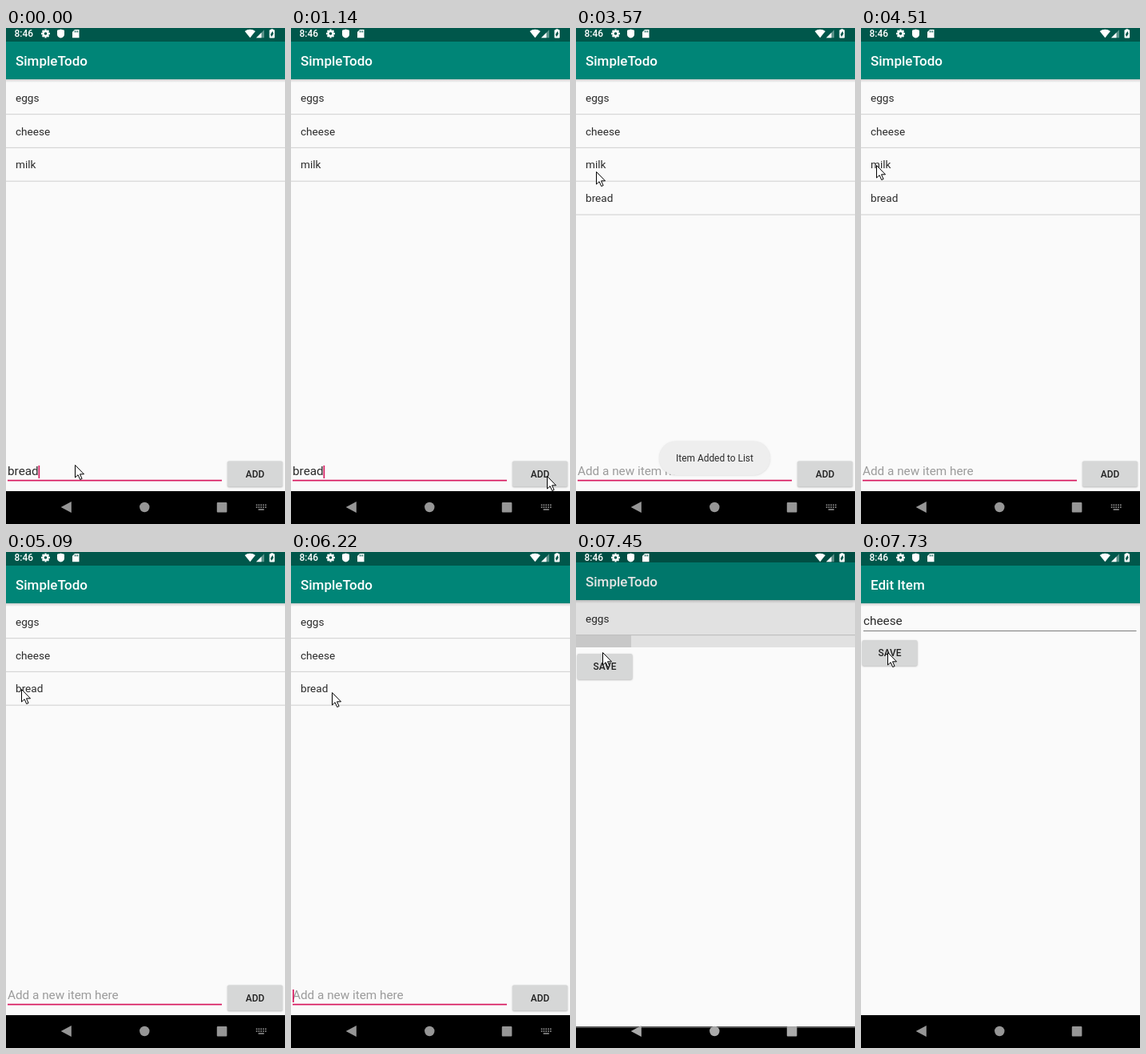
These frames come from a looping animation (349 by 619 pixels, 8000 ms). An HTML page with a canvas:

```html
<!DOCTYPE html>
<html lang="en">
<head>
<meta charset="utf-8">
<title>Todo list</title>
<style>
html, body { margin: 0; width: 100%; height: 100%; overflow: hidden; background: #fafafa; }
canvas { display: block; }
</style>
</head>
<body>
<canvas id="stage" width="349" height="619"></canvas>
<script>
const W = 349, H = 619, NAV = 578, BAR = 64, ROW = 41.8;
const LOOP = 8000, TICK = 143;
const INK = '#2b2b2b', PINK = '#d81b60', PAPER = '#fafafa', PRESS = 'rgba(0,0,0,0.11)';
const CLEARED = 2010, REMOVED = 4930, OPEN = 7301, OPEN_TIME = 400;
const g = document.getElementById('stage').getContext('2d');

// Each glide of the pointer: start, end, destination
const glides = [
  { from: 800, to: 1140, x: 320, y: 559 },
  { from: 2170, to: 2430, x: 260, y: 512 },
  { from: 2440, to: 3690, x: 19, y: 171 },
  { from: 5300, to: 5720, x: 58, y: 178 },
  { from: 5900, to: 6140, x: 51, y: 175 },
  { from: 6150, to: 6720, x: 33, y: 125 }
];

const clamp = v => Math.max(0, Math.min(1, v));
const smooth = u => u * u * (3 - 2 * u);
const within = (t, a, b) => t >= a && t < b;

function pointerAt(t) {
  let x = 86, y = 545;
  for (const m of glides) {
    const u = smooth(clamp((t - m.from) / (m.to - m.from)));
    x += (m.x - x) * u;
    y += (m.y - y) * u;
  }
  return [Math.round(x), Math.round(y)];
}

function rect(x, y, w, h, color) {
  g.fillStyle = color;
  g.fillRect(x, y, w, h);
}

function poly(points, color) {
  g.beginPath();
  points.forEach(([x, y]) => g.lineTo(x, y));
  g.closePath();
  g.fillStyle = color;
  g.fill();
}

function disc(x, y, r, color) {
  g.beginPath();
  g.arc(x, y, r, 0, 2 * Math.PI);
  g.fillStyle = color;
  g.fill();
}

function pill(x, y, w, h, r, color) {
  g.beginPath();
  g.roundRect(x, y, w, h, r);
  g.fillStyle = color;
  g.fill();
}

function text(s, x, y, size, color = INK, weight = 400, align = 'left') {
  g.font = `${weight} ${size}px Roboto, sans-serif`;
  g.textAlign = align;
  g.fillStyle = color;
  g.fillText(s, x, y);
}

function shadow(blur, dy, alpha) {
  g.shadowColor = `rgba(0,0,0,${alpha})`;
  g.shadowBlur = blur;
  g.shadowOffsetY = dy;
}

function button(label, x, y, pressed) {
  g.save();
  shadow(pressed ? 5 : 2, pressed ? 2 : 0.8, 0.28);
  pill(x, y, 69, 32, 2, pressed ? '#bfc0c0' : '#d6d7d7');
  g.restore();
  text(label, x + 34.5, y + 20, 11.9, '#212121', 500, 'center');
}

function header(title) {
  rect(0, 0, W, NAV, PAPER);
  const fade = g.createLinearGradient(0, BAR, 0, BAR + 4);
  fade.addColorStop(0, '#cfcfcf');
  fade.addColorStop(1, PAPER);
  rect(0, BAR, W, 4, fade);
  rect(0, 0, W, BAR, '#008577');
  rect(0, 0, W, 17, '#00574b');
  text(title, 12, 47.3, 17, '#fff', 500);
}

function listScreen(t) {
  header('SimpleTodo');
  const typed = t < CLEARED;
  const items = ['eggs', 'cheese', 'milk', 'bread'];
  if (typed) items.pop();
  if (t >= REMOVED) items.splice(2, 1);

  if (within(t, REMOVED - 290, REMOVED)) rect(0, 66 + 2 * ROW, 58, ROW, PRESS);
  if (t >= OPEN) rect(0, 66 + ROW, 69, ROW, PRESS);
  items.forEach((item, i) => {
    text(item, 12, 91.8 + ROW * i, 13.6);
    rect(0, 107 + ROW * i, W, 1.2, '#d6d6d6');
  });

  text(typed ? 'bread' : 'Add a new item here', 2, 558, 15.3, typed ? INK : '#9b9b9b');
  rect(2, 563.8, 268, 1.7, PINK);
  const caret = typed ? t % 1000 < 560 : (t - 265) % 850 < 430;
  if (caret) rect(typed ? 40.5 : 2, 546, 1.7, 16, PINK);
  button('ADD', 277, 540.5, within(t, 1870, 2290));
}

function editScreen() {
  header('Edit Item');
  text('cheese', 3, 91, 15.3);
  rect(3, 98, 341.5, 1, '#7c7c7c');
  button('SAVE', 1.5, 110, false);
}

// The new screen is revealed from below while the old one lifts and dims
function openEdit(t, u) {
  const rest = 1 - u;
  const shift = Math.round(39 * rest ** 2);
  const edge = Math.round(H * rest ** 4);
  g.save();
  g.translate(0, Math.round(-7 * (1 - rest ** 2)));
  listScreen(t);
  g.restore();
  rect(0, 0, W, NAV, 'rgba(0,0,0,0.1)');

  g.save();
  g.beginPath();
  g.rect(0, edge, W, H - edge);
  g.clip();
  g.translate(0, shift);
  editScreen();
  g.restore();
  const foot = NAV + shift - 3;
  rect(0, foot, W, H - foot, '#000');
  rect(0, foot, W, 2, '#555');
}

function drawToast(t) {
  g.save();
  g.globalAlpha = clamp(Math.min((t - 2180) / 275, (4430 - t) / 360));
  shadow(2, 0.5, 0.12);
  pill(104, 515.5, 139, 42.5, 21, '#eee');
  g.shadowColor = 'transparent';
  text('Item Added to List', 173.5, 541.3, 11.9, INK, 400, 'center');
  g.restore();
}

function gear(x, y, color, hole) {
  g.save();
  g.translate(x, y);
  for (let i = 0; i < 8; i++) {
    rect(-1.2, -5.4, 2.4, 3, color);
    g.rotate(Math.PI / 4);
  }
  g.restore();
  disc(x, y, 4.1, color);
  disc(x, y, 1.8, hole);
}

function statusIcons() {
  const c = '#fff', hole = '#00574b';
  text('8:46', 10.5, 11.3, 11.9, c, 500);
  gear(49.5, 7, c, hole);

  pill(64, 2.4, 9, 10, [1, 1, 5, 5], c);
  poly([[64, 3.3], [68.5, 1.4], [73, 3.3]], c);

  poly([[86, 2], [91.5, 2], [91.5, 12.2], [83, 12.2], [83, 5]], c);
  for (let i = 0; i < 3; i++) rect(85.6 + i * 1.8, 3.3, 0.9, 2.2, hole);

  g.beginPath();
  g.moveTo(305.3, 12.3);
  g.arc(305.3, 12.3, 10.6, -Math.PI * 0.715, -Math.PI * 0.285);
  g.fillStyle = c;
  g.fill();

  const wedge = (size, color) =>
    poly([[313, 12.2], [313 + size, 12.2], [313 + size, 12.2 - size]], color);
  wedge(10, 'rgba(255,255,255,0.35)');
  wedge(6.5, c);

  rect(331.3, 1.3, 3, 2, c);
  pill(329.5, 2.2, 6.6, 10.4, 0.8, c);
  poly([[333.4, 4], [330.9, 8], [332.2, 11], [334.7, 7]], hole);
}

function navIcons(color, keyboard) {
  poly([[68.7, 598], [81.8, 591], [81.8, 605]], color);
  disc(173.3, 598, 6.2, color);
  pill(263.8, 592, 12.6, 12.6, 1, color);
  if (!keyboard) return;
  for (let i = 0; i < 10; i++) {
    rect(312.8 + (i % 5) * 2.8, 594.5 + (i > 4 ? 2.8 : 0), 1.6, 1.6, color);
  }
  rect(315.6, 600.2, 7.2, 1.5, color);
}

function drawPointer(x, y) {
  g.save();
  g.translate(x + 0.5, y + 0.5);
  poly([[0, 0], [0, 15.5], [3.6, 12.2], [6.2, 18], [8.6, 17], [6, 11.3], [11, 11.3]], '#fff');
  g.strokeStyle = '#000';
  g.stroke();
  g.restore();
}

function draw(t) {
  const held = Math.floor((t + 10) / TICK) * TICK;
  const u = clamp((held - OPEN) / OPEN_TIME);
  const moving = u > 0 && u < 1;
  rect(0, 0, W, H, '#000');
  if (moving) openEdit(t, u);
  else if (u === 1) editScreen();
  else listScreen(t);
  drawToast(held);
  statusIcons();
  navIcons(moving ? '#aaa' : '#969696', u === 0);
  drawPointer(...pointerAt(held));
}

const begin = performance.now();
function tick() {
  draw((performance.now() - begin) % LOOP);
  requestAnimationFrame(tick);
}
tick();
</script>
</body>
</html>
```
